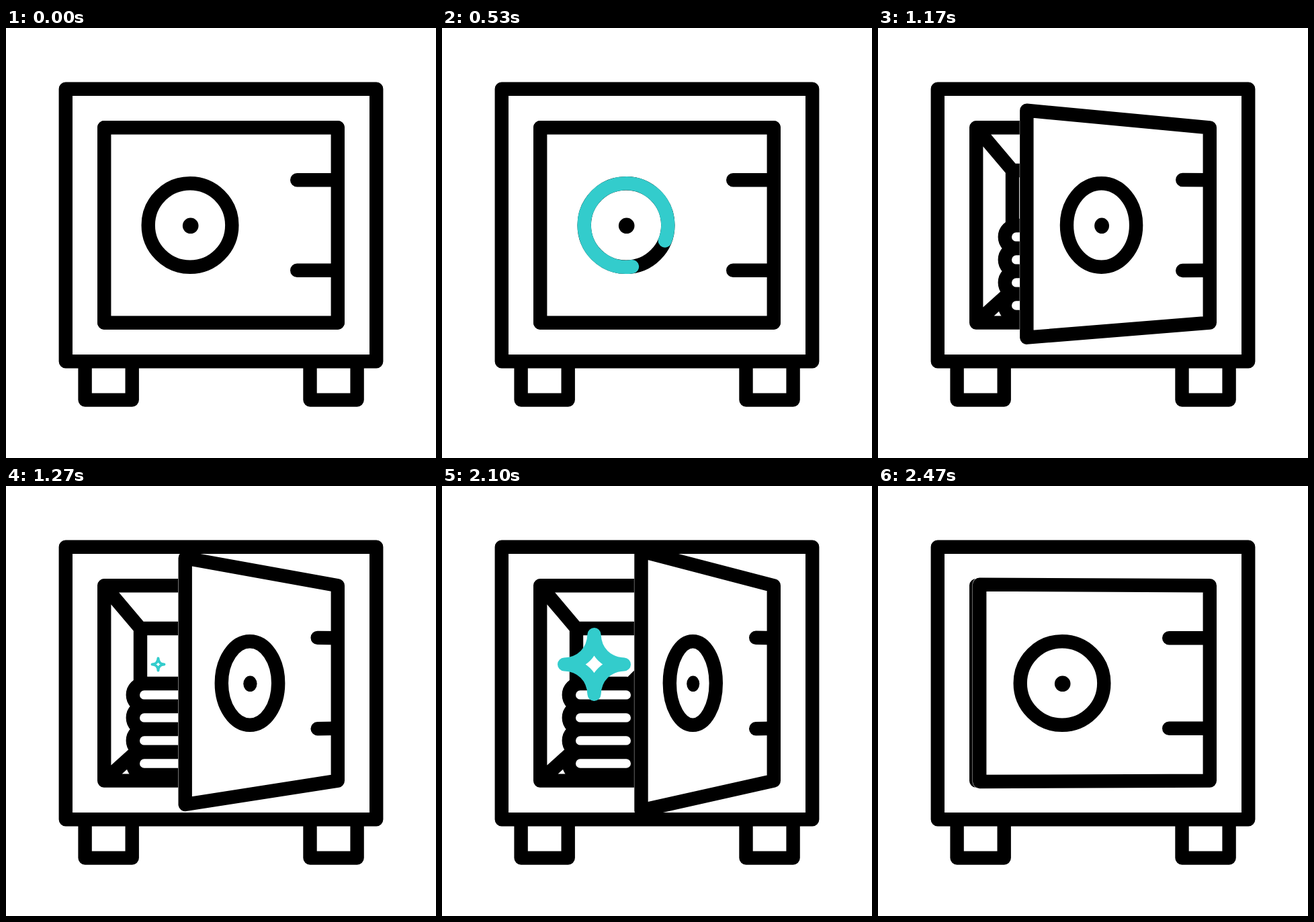
Animation of 640x640 px, one loop 2500 ms. Source, as an HTML page:

```html
<!DOCTYPE html>
<html lang="en">
<head>
<meta charset="utf-8">
<title>Safe</title>
<style>
html, body { margin: 0; height: 100%; overflow: hidden; background: #fff; }
svg { display: block; width: 100vw; height: 100vh; }
g { fill: none; stroke: #000; stroke-width: 20.4; stroke-linecap: round; stroke-linejoin: round; }
.white { fill: #fff; }
.teal { stroke: #3cc; }
</style>
</head>
<body>
<svg viewBox="0 0 640 640">
  <g>
    <!-- interior -->
    <path d="M146.2 148.3H493.8V438.6H146.2ZL200 212H400M146.2 438.6L200 390V212M281 294L300 275"/>
    <g id="bills" class="white"></g>
    <path id="star" class="teal" d="M0-45C1-19 19-1 45 0C19 1 1 19 0 45C-1 19-19 1-45 0C-19-1-1-19 0-45Z"/>
    <path id="gap" stroke="#fff" stroke-width="21.2"/>
    <!-- cabinet and feet -->
    <path d="M88.8 90.8H551.2V496.3H88.8ZM117.6 496.3V553.6H187.7V496.3M452.5 496.3V553.6H522.6V496.3"/>
    <!-- door -->
    <path id="door" class="white"/>
    <path id="hinges"/>
    <ellipse id="dial" cy="293.5" ry="62.3"/>
    <ellipse id="dot" cy="294.3" ry="11.8" fill="#000" stroke="none"/>
    <circle id="arc" class="teal" cx="274" cy="293.5" r="62.3" pathLength="360"/>
  </g>
</svg>
<script>
const $ = id => document.getElementById(id);
const set = (id, attrs) => {
  for (const k in attrs) $(id).setAttribute(k, attrs[k]);
};
const ramp = (f, a, b) => Math.min(1, Math.max(0, (f - a) / (b - a)));
const ease = (f, a, b) => { const x = ramp(f, a, b); return x * x * (3 - 2 * x); };
// rises from a to b, falls from c to d
const pulse = (f, a, b, c, d) => ease(f, a, b) - ease(f, c, d);

$("bills").innerHTML = [294, 328, 362, 396].map(y =>
  `<rect x="188.8" y="${y}" width="102.4" height="34" rx="17"/>`).join("");

function draw(f) {
  const open = pulse(f, 28, 42, 63, 75.35);
  const slide = pulse(f, 28, 40.5, 63, 74);
  const squash = pulse(f, 29.5, 42.5, 63, 74);
  const shine = pulse(f, 36, 43, 62.5, 70);

  const x = 146.2 + 150.3 * open;
  const d = `M${x} ${148.3 - 51.3 * open}L493.8 148.3V438.6L${x} ${438.6 + 44.2 * open}Z`;
  set("door", { d });
  set("gap", { d, visibility: open > 0 ? "visible" : "hidden" });

  const hx = 433.2 + 34 * slide;
  set("hinges", { d: `M${hx} ${226.2 - .4 * slide}L493.8 226.2M${hx} ${360.7 + .6 * slide}L493.8 360.7` });
  set("dial", { cx: 274 + 99.3 * slide, rx: 62.3 - 27.8 * squash });
  set("dot", { cx: 274.7 + 99 * slide, rx: 11.8 - 2.3 * squash });

  const len = 360 * (ramp(f, 6, 18) - ramp(f, 18, 29));
  const turn = 81.7 + 22.8 * (f - 16) + (f > 18 ? 360 - len : 0);
  set("arc", {
    "stroke-dasharray": `${len} 360`,
    transform: `rotate(${turn} 274 293.5)`,
    visibility: len > 0 ? "visible" : "hidden"
  });

  set("star", {
    transform: `translate(226.5 265.5) scale(${shine})`,
    visibility: shine > 0 ? "visible" : "hidden"
  });
}

const start = performance.now();
function tick() {
  const ms = (performance.now() - start) % 2500;
  draw(Math.floor(ms * .03 + .15) % 75); // 30 steps per second
  requestAnimationFrame(tick);
}
tick();
</script>
</body>
</html>
```
